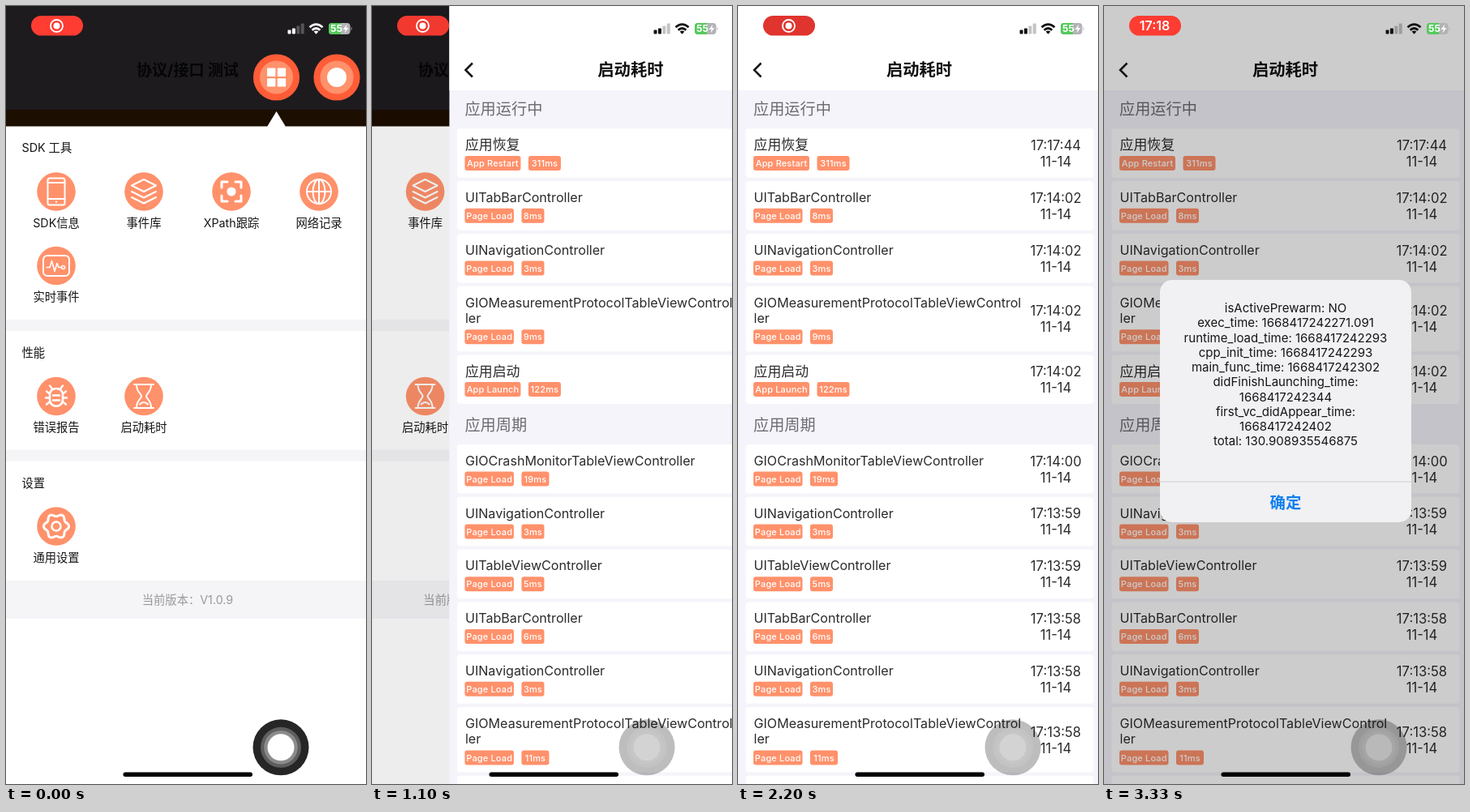
Recreate the animation shown at these times as an HTML page. Size 444 by 960 pixels, loop 3.47 s.

```html
<!DOCTYPE html>
<html lang="zh-CN">
<head>
<meta charset="utf-8">
<title>启动耗时</title>
<style>
html, body { margin: 0; width: 100%; height: 100%; overflow: hidden; background: #fff; }
svg { display: block; width: 444px; height: 960px; }
text { font-family: Inter, "Noto Sans CJK SC", "Noto Sans CJK", sans-serif; white-space: pre; }
</style>
</head>
<body>
<svg id="stage" viewBox="0 0 444 960"></svg>
<script>
const LOOP = 3470;
const CORAL = '#ff916b';

// y is the optical middle of the line
const text = (x, y, str, size, fill = '#161616', attrs = '') =>
  `<text x="${x}" y="${y + size * 0.365}" font-size="${size}" fill="${fill}" ${attrs}>${str}</text>`;
const mid = (x, y, str, size, fill, attrs = '') =>
  text(x, y, str, size, fill, 'text-anchor="middle" ' + attrs);
const rect = (x, y, w, h, fill, r = 0, attrs = '') =>
  `<rect x="${x}" y="${y}" width="${w}" height="${h}" rx="${r}" fill="${fill}" ${attrs}/>`;
const disc = (x, y, r, fill, attrs = '') =>
  `<circle cx="${x}" cy="${y}" r="${r}" fill="${fill}" ${attrs}/>`;
const path = (d, attrs = '') => `<path d="${d}" ${attrs}/>`;
const group = (id, body, attrs = '') => `<g id="${id}" ${attrs}>${body}</g>`;

function gear() {
  let d = '';
  for (let i = 0; i < 72; i++) {
    const a = i * Math.PI / 36;
    const r = 13.9 + 1.7 * Math.cos(6 * a);
    d += (i ? 'L' : 'M') + (r * Math.cos(a)).toFixed(2) + ' ' + (r * Math.sin(a)).toFixed(2);
  }
  return path(d + 'Z', 'stroke-width="3"') + disc(0, 0, 5.5, 'none', 'stroke-width="2.6"');
}

const icons = {
  phone: rect(-10.5, -16.5, 21, 33, 'none', 2.5) + path('M-10.5 -11H10.5M-10.5 9H10.5') +
    disc(0, 12.7, 1.2, '#fff', 'stroke="none"'),
  layers: path('M0 -15L15 -7.5L0 0L-15 -7.5ZM-15 0L0 7.5L15 0M-15 7L0 14.5L15 7'),
  focus: path('M-12 -5V-12H-5M5 -12H12V-5M12 5V12H5M-5 12H-12V5', 'stroke-width="3"') +
    disc(0, 0, 5.6, '#fff', 'stroke="none"'),
  globe: disc(0, 0, 15, 'none') + '<ellipse rx="7.5" ry="15"/>' + path('M0 -15V15M-15 0H15'),
  pulse: rect(-16, -12.5, 32, 25, 'none', 5) +
    path('M-12 2H-8L-5.5 -6L-2 7L1 -3L3 2H6', 'stroke-width="1.6"') +
    disc(8.5, 2, 2, 'none', 'stroke-width="1.6"'),
  bug: path('M-8 -2C-8 -12 8 -12 8 -2V4C8 15 -8 15 -8 4Z', 'stroke-width="2.6"') +
    path('M-4 -1H4M-4 5H4M-5 -9L-8 -13M5 -9L8 -13M-8 -3L-12 -6M8 -3L12 -6M-8 2H-13M8 2H13M-8 7L-12 10M8 7L12 10',
      'stroke-width="2.4"'),
  glass: path('M-12 -14.5H12M-12 14.5H12M-9 -14C-9 -5 -3 -3 -3 0C-3 3 -9 5 -9 14M9 -14C9 -5 3 -3 3 0C3 3 9 5 9 14M-5 10Q0 5 5 10'),
  gear: gear()
};

const tool = (x, y, icon, label) => disc(x, y, 23.8, CORAL) +
  `<g transform="translate(${x} ${y})" fill="none" stroke="#fff" stroke-width="2" stroke-linejoin="round" stroke-linecap="round">${icons[icon]}</g>` +
  mid(x, y + 38.7, label, 14.3);

const bubble = x => disc(x, 88, 28.6, '#ff5c38') + disc(x, 88, 20.6, CORAL);

function menu() {
  let s = rect(0, 0, 444, 129, '#1d1b1e') + rect(0, 128, 444, 21, '#1c0e00') +
    mid(224, 79, '协议/接口 测试', 19, '#060506', 'font-weight="700"') +
    rect(0, 148.5, 444, 812, '#fff') +
    path('M333.5 130L322 149H345Z', 'fill="#fff"') + bubble(333.5) + bubble(408);
  for (const x of [322, 334.7])
    for (const y of [76.5, 89.2]) s += rect(x, y, 10.4, 10.4, '#fff', 1);
  s += disc(408, 88, 12, '#fff');
  for (const [y, h] of [[387, 14], [547.5, 14], [709, 47]]) s += rect(0, y, 444, h, '#f5f5f8');
  return s + text(19.5, 174.5, 'SDK 工具', 14.3) + text(19.5, 427.5, '性能', 14.3) +
    text(19.5, 588.5, '设置', 14.3) +
    tool(62, 229, 'phone', 'SDK信息') + tool(170, 229, 'layers', '事件库') +
    tool(278, 229, 'focus', 'XPath跟踪') + tool(386, 229, 'globe', '网络记录') +
    tool(62, 320.5, 'pulse', '实时事件') + tool(62, 481.5, 'bug', '错误报告') +
    tool(170, 481.5, 'glass', '启动耗时') + tool(62, 642, 'gear', '通用设置') +
    mid(224, 733, '当前版本：V1.0.9', 14.3, '#99999d');
}

const LOAD = 'Page Load';
const NAV = 'UINavigationController';
const TAB = 'UITabBarController';
const LONG = 'GIOMeasurementProtocolTableViewControl|ler';
const rows = [
  ['应用恢复', 'App Restart', '311ms', '17:17:44'],
  [TAB, LOAD, '8ms', '17:14:02'],
  [NAV, LOAD, '3ms', '17:14:02'],
  [LONG, LOAD, '9ms', '17:14:02'],
  ['应用启动', 'App Launch', '122ms', '17:14:02'],
  '应用周期',
  ['GIOCrashMonitorTableViewController', LOAD, '19ms', '17:14:00'],
  [NAV, LOAD, '3ms', '17:13:59'],
  ['UITableViewController', LOAD, '5ms', '17:13:59'],
  [TAB, LOAD, '6ms', '17:13:58'],
  [NAV, LOAD, '3ms', '17:13:58'],
  [LONG, LOAD, '11ms', '17:13:58'],
  [NAV, LOAD, '3ms', '17:13:58']
];

const tag = (x, y, w, str) => rect(x, y, w, 18, CORAL, 3) +
  mid(x + w / 2, y + 9.1, str, 11, '#fff', 'font-weight="500" letter-spacing=".15"');

function row(y, [name, kind, cost, time]) {
  const lines = name.split('|');
  const extra = (lines.length - 1) * 20;
  const size = /^[A-Z]/.test(name) ? 16.1 : 16.9;
  const w = kind === LOAD ? 60.5 : 69;
  const c = y + 30.6 + extra / 2;
  return rect(9.5, y, 429, 60.6 + extra, '#fff', 4) +
    lines.map((l, i) => text(19.5, y + 20 + i * 19.5, l, size, '#2b2b2d')).join('') +
    tag(19, y + 33.6 + extra, w, kind) +
    tag(28.5 + w, y + 33.6 + extra, 10 + cost.length * 6, cost) +
    mid(392, c - 10, time, 16.6, '#2b2b2d') + mid(392, c + 10, '11-14', 16.6, '#2b2b2d');
}

function list() {
  let s = rect(0, 0, 444, 960, '#f5f4fb') + rect(0, 0, 444, 104, '#fff') +
    path('M28.5 70.5L20 79L28.5 87.5', 'fill="none" stroke="#161616" stroke-width="2.5"') +
    mid(223.5, 79, '启动耗时', 20.3, '#111', 'font-weight="700"') +
    text(19, 127, '应用运行中', 19.2, '#6c6b70');
  let y = 151.3;
  for (const r of rows) {
    if (typeof r === 'string') {
      s += text(19, y + 21.5, r, 19.2, '#6c6b70');
      y += 45.8;
    } else {
      s += row(y, r);
      y += r[0] === LONG ? 84.7 : 64.8;
    }
  }
  return s;
}

const report = ['isActivePrewarm: NO', 'exec_time: 1668417242271.091',
  'runtime_load_time: 1668417242293', 'cpp_init_time: 1668417242293',
  'main_func_time: 1668417242302', 'didFinishLaunching_time:', '1668417242344',
  'first_vc_didAppear_time:', '1668417242402', 'total: 130.908935546875'];

const alertBox = () => rect(69, 338, 310, 299, '#f1f0f3', 15) +
  report.map((l, i) => mid(224, 372.7 + i * 18.23, l, 15, '#161616')).join('') +
  rect(69, 586.5, 310, 1, '#cfced3') +
  mid(224, 613, '确定', 19.4, '#0f7ff0', 'font-weight="700"');

const status = () => {
  let s = '';
  [5, 7, 10, 13].forEach((h, i) => {
    s += rect(347.5 + i * 5.4, 34.5 - h, 4, h, 'currentColor', 1, `opacity="${i < 2 ? 1 : 0.25}"`);
  });
  return s + path('M374.5 26.2Q382.5 19 390.5 26.2M377.6 29.7Q382.5 25.3 387.4 29.7',
    'fill="none" stroke="currentColor" stroke-width="2.7"') +
    path('M379.6 31.6Q382.5 29.3 385.4 31.6L382.5 34.8Z', 'fill="currentColor"');
};

const battery = rect(398, 21, 26.5, 14, '#b3b3b6', 4) +
  path('M402 21H413V35H402A4 4 0 0 1 398 31V25A4 4 0 0 1 402 21Z', 'fill="#55c95c"') +
  path('M425.6 25.5Q427.6 28 425.6 30.5Z', 'fill="#b3b3b6"') +
  mid(407.5, 28, '55', 12, '#fff', 'font-weight="700"') +
  path('M420.5 22.5L415.5 29H418.7L417.5 33.5L422.5 27H419.3Z', 'fill="#fff"');

const pill = rect(31, 12, 64, 24.6, '#ff3b30', 12.3, 'id="capsule"') +
  group('rec', disc(62.5, 24.5, 7.5, 'none', 'stroke="#fff" stroke-width="1.9"') + disc(62.5, 24.5, 4, '#fff')) +
  mid(62.5, 24.6, '17:18', 16, '#fff', 'id="clock" font-weight="600"');

// radius, colour, idle opacity, pressed opacity
const ball = [
  [34.5, '#000', 0.26, 0.85], [25, '#fff', 0.09, 0.26],
  [20.8, '#fff', 0.05, 0.28], [16.5, '#fff', 0.22, 1]
];

const $ = id => document.getElementById(id);
$('stage').innerHTML = group('menu', menu()) +
  rect(0, 0, 444, 960, '#000', 0, 'id="shade"') + group('list', list()) +
  rect(0, 0, 444, 960, '#000', 0, 'id="dim"') + group('alert', alertBox()) +
  group('status', status()) + battery + pill +
  group('ball', ball.map(b => disc(339, 914.8, b[0], b[1])).join('')) +
  rect(144.5, 945.5, 159.5, 5.4, '#000', 2.7);

const clamp = v => Math.max(0, Math.min(1, v));
const mix = (a, b, k) => a + (b - a) * k;
const set = (id, name, v) => $(id).setAttribute(name, v);

// critically damped spring from 0 to 1
function spring(ms) {
  const x = Math.max(0, ms) * 0.018;
  return 1 - (1 + x) * Math.exp(-x);
}

function draw(t) {
  const push = t >= 1500 ? 1 : spring(t - 939);
  set('menu', 'transform', `translate(${-133 * push} 0)`);
  set('shade', 'opacity', 0.09 * push);
  set('list', 'transform', `translate(${444 * (1 - push)} 0)`);
  $('status').style.color = t < 1000 ? '#fff' : '#111';

  const show = t >= 2800 ? 1 : spring(t - 2250);
  const k = 1 + 0.15 * (1 - show);
  set('dim', 'opacity', 0.2 * show);
  set('alert', 'opacity', show);
  set('alert', 'transform', `translate(224 487.5) scale(${k}) translate(-224 -487.5)`);

  const press = clamp(1 - t / 600);
  ball.forEach((b, i) => $('ball').children[i].setAttribute('opacity', mix(b[2], b[3], press)));

  const swap = clamp((t - 2600) / 300);
  const wave = 0.5 + 0.5 * Math.cos(t / 1400 * 2 * Math.PI);
  const glow = mix(wave, 1, swap);
  set('capsule', 'fill', `rgb(${mix(222, 254, glow)},${mix(52, 60, glow)},${mix(46, 50, glow)})`);
  set('rec', 'opacity', 1 - swap);
  set('clock', 'fill', `rgb(${mix(150, 255, swap)},${mix(20, 255, swap)},${mix(20, 255, swap)})`);
  set('clock', 'opacity', t < 2600 ? 0 : mix(0.35, 1, swap));
}

const tick = t => t >= 3330 ? 3330 : Math.min(3200, Math.floor(t / 100) * 100);

const start = performance.now();
let last = 0;
draw(0);
function loop() {
  const t = tick((performance.now() - start) % LOOP);
  if (t !== last) draw(last = t);
  requestAnimationFrame(loop);
}
requestAnimationFrame(loop);
</script>
</body>
</html>
```
